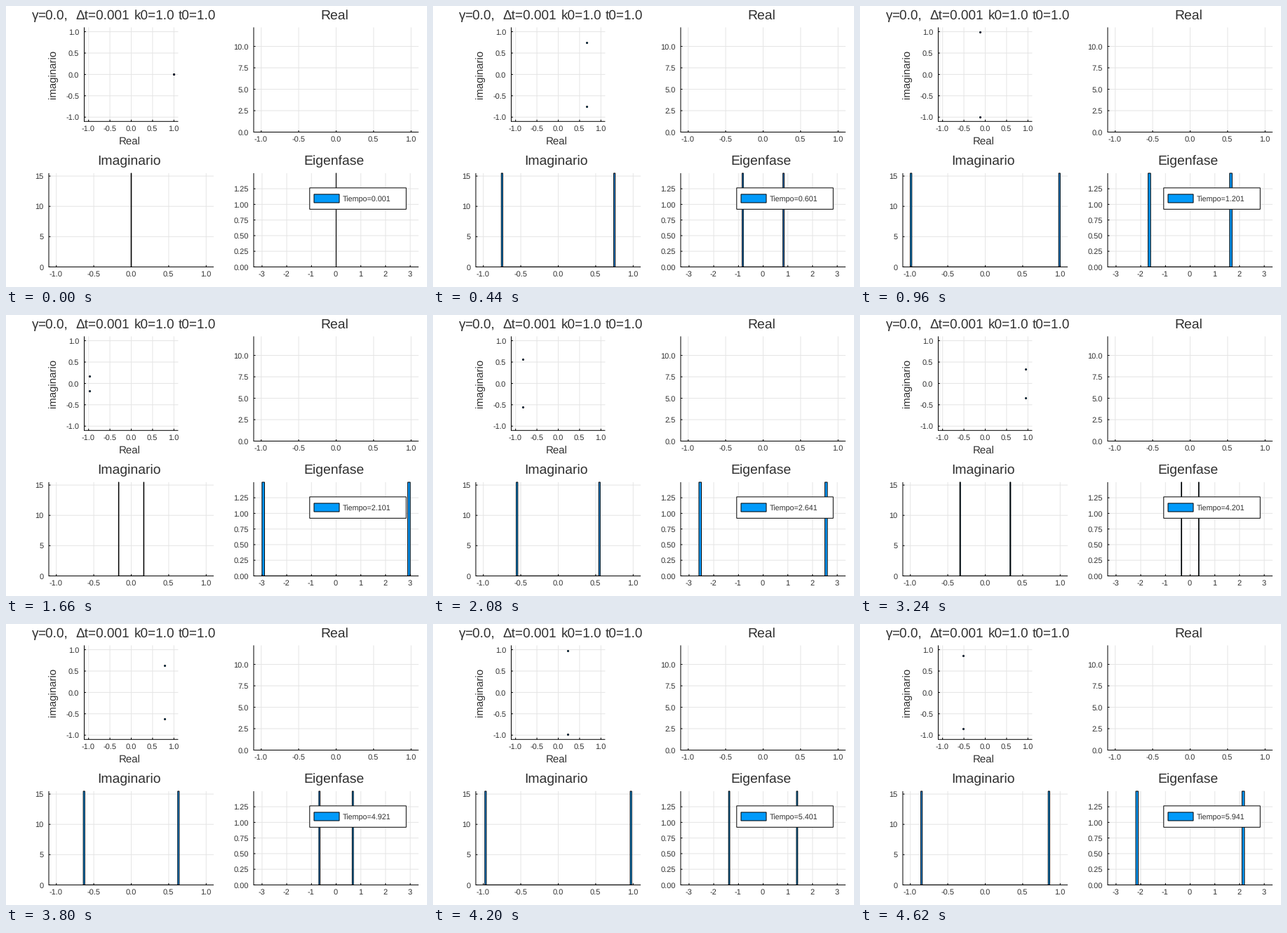
A matplotlib script for the animation above (4640 ms loop, 600x400 px).

```python
import math

import matplotlib.pyplot as plt
from matplotlib.animation import FuncAnimation
from matplotlib.collections import LineCollection
from matplotlib.patches import Rectangle

W, H, DPI = 600, 400, 100
PX = 72 / DPI                  # one pixel in points
TICK_MS, TICKS = 20, 232
BLUE, INK, GRID = "#009afa", "#303030", "#e5e5e5"
TITLE, LABEL, SMALL = 19.4, 15, 11

plt.rcParams["font.family"] = "Liberation Sans"
plt.rcParams["text.hinting"] = "none"
fig = plt.figure(figsize=(W / DPI, H / DPI), dpi=DPI, facecolor="white")
stage = fig.add_axes([0, 0, 1, 1])
stage.set_xlim(0, W)
stage.set_ylim(H, 0)
stage.axis("off")


def write(x, y, text, size, ha="center", va="baseline", **kw):
    return stage.text(x, y, text, fontsize=size * PX, color=INK, ha=ha,
                      va=va, zorder=6, **kw)


def segments(lines, color, z):
    stage.add_collection(
        LineCollection(lines, colors=color, linewidths=PX, zorder=z,
                       snap=False),
        autolim=False)


def box(x, y, w, h, fill, z):
    return stage.add_patch(Rectangle((x, y), w, h, fc=fill, ec="black",
                                     lw=PX, snap=False, zorder=z))


class Panel:
    """Plot area in pixels, with x symmetric around zero."""

    def __init__(self, left, right, top, bottom, mid, xscale, zero, yscale):
        self.left, self.right = left, right
        self.top, self.bottom = top, bottom
        self.mid, self.xscale = mid, xscale
        self.zero, self.yscale = zero, yscale

    def x(self, v):
        return self.mid + v * self.xscale

    def y(self, v):
        return self.zero - v * self.yscale

    def frame(self, xticks, xfmt, yticks, yfmt):
        grid, marks = [], []
        for v in xticks:
            px = self.x(v)
            grid.append([(px, self.top), (px, self.bottom)])
            marks.append([(px, self.bottom), (px, self.bottom - 2.5)])
            write(px - 0.5, self.bottom + 13.7, format(v, xfmt), SMALL)
        for v in yticks:
            py = self.y(v)
            grid.append([(self.left, py), (self.right, py)])
            marks.append([(self.left, py), (self.left + 2.5, py)])
            write(self.left - 7.3, py + 4, format(v, yfmt), SMALL, ha="right")
        marks.append([(self.left, self.top), (self.left, self.bottom + 0.5)])
        marks.append([(self.left, self.bottom), (self.right, self.bottom)])
        segments(grid, GRID, 1)
        segments(marks, "black", 4)


class PairHistogram:
    """Bars for the samples -v and +v, with empty bins between them."""

    def __init__(self, panel, bins):
        self.panel, self.bins = panel, bins
        height = panel.bottom - panel.top
        self.bars = [box(panel.mid, panel.top, 1, height, BLUE, 3)
                     for _ in range(2)]
        self.base, = stage.plot([], [], color="black", lw=PX, snap=False,
                                zorder=3)

    def update(self, v):
        step = nice_step(2 * abs(v) / self.bins)
        for bar, sample in zip(self.bars, (-v, v)):
            bar.set_x(self.panel.x(math.floor(sample / step) * step))
            bar.set_width(step * self.panel.xscale)
        self.base.set_data([bar.get_x() for bar in self.bars],
                           [self.panel.bottom] * 2)


def nice_step(raw):
    base = 10 ** math.floor(math.log10(raw))
    for limit, step in ((1.1, 1), (2.2, 2), (5.5, 5)):
        if raw <= limit * base:
            return step * base
    return 10 * base


halves = (-1, -0.5, 0, 0.5, 1)

plane = Panel(111.5, 245.4, 30.4, 164.3, 178.5, 60.8, 97.4, 60.8)
plane.frame(halves, ".1f", halves, ".1f")
real = Panel(353, 588, 30.4, 179.5, 470.5, 106.8, 179.5, 12.2)
real.frame(halves, ".1f", (0, 2.5, 5, 7.5, 10), ".1f")
imag = Panel(61, 296, 238, 371.4, 178.5, 106.8, 371.4, 8.62)
imag.frame(halves, ".1f", (0, 5, 10, 15), "d")
phase = Panel(353, 588, 238, 371.4, 470.5, 35.2, 371.4, 89)
phase.frame(range(-3, 4), "d", [i / 4 for i in range(6)], ".2f")

for x, part in ((36.5, "γ"), (45, "=0.0,"), (99.5, "Δt=0.001"),
                (182.5, "k0=1.0"), (246, "t0=1.0")):
    write(x, 18.5, part, TITLE - 0.4, ha="left")
write(468, 19, "Real", TITLE)
write(175.5, 226, "Imaginario", TITLE)
write(467.5, 226, "Eigenfase", TITLE)
write(176.5, 198, "Real", LABEL)
write(67, 97.4, "imaginario", LABEL, va="center", rotation=90)

# Legend
box(432.8, 258.9, 137.5, 30.4, "white", 5)
box(439, 268, 36, 12, BLUE, 5)
clock = write(479.7, 279, "", SMALL - 0.3, ha="left")

dots, = stage.plot([], [], "o", ms=2 * PX, mfc=BLUE, mec="black", mew=PX,
                   snap=False, zorder=3)
imag_bars = PairHistogram(imag, 100)
phase_bars = PairHistogram(phase, 60)


def step_at(tick):
    """Steps come in threes: two short ones, then a long hold."""
    cycle, pos = divmod(tick + 1, 7)
    return 3 * cycle + min(pos, 2) - 1


def draw(tick):
    t = 0.001 + 0.06 * step_at(tick)
    angle = math.sqrt(2) * t
    c, s = math.cos(angle), math.sin(angle)
    dots.set_data([plane.x(c)] * 2, [plane.y(s), plane.y(-s)])
    imag_bars.update(s)
    phase_bars.update(math.atan2(s, c))
    clock.set_text(f"Tiempo={t:.3f}")
    return [dots, clock, *imag_bars.bars, *phase_bars.bars]


anim = FuncAnimation(fig, draw, frames=TICKS, interval=TICK_MS,
                     repeat=True, repeat_delay=0)
plt.show()
```
